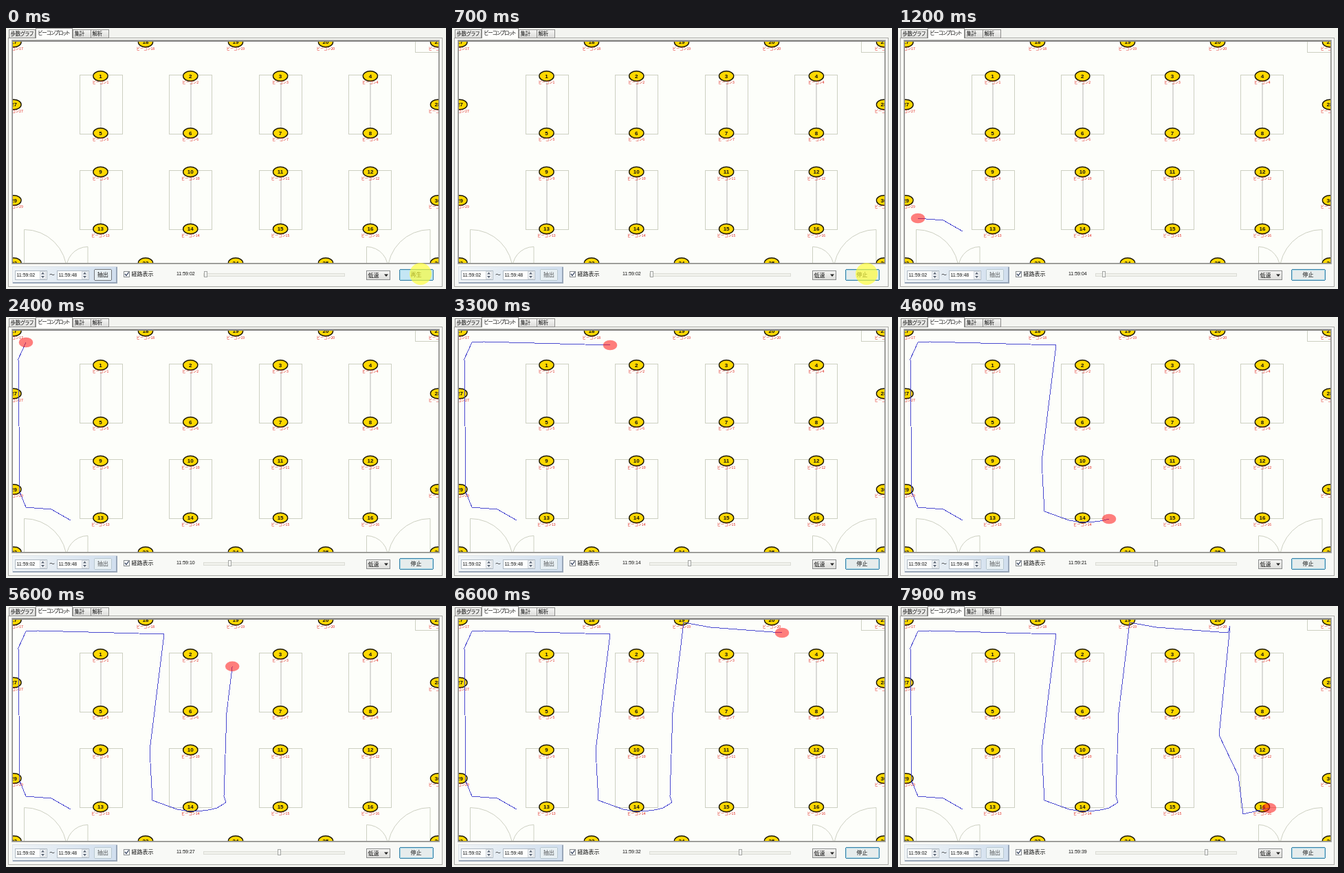
These frames come from a looping animation (640x380 px, 8 s). An HTML page:

```html
<!DOCTYPE html>
<html lang="ja">
<head>
<meta charset="utf-8">
<style>
html, body { margin: 0; width: 100%; height: 100%; overflow: hidden; background: #f3f4f0; }
svg { display: block; width: 640px; height: 380px; }
text { font-family: "Noto Sans CJK JP", "Noto Sans CJK", sans-serif; font-size: 8px; fill: #111; }
.num { font: 7px "Liberation Sans", Arial, sans-serif; }
.tab { font-size: 7.5px; font-feature-settings: "palt"; letter-spacing: -.25px; }
.tight { letter-spacing: -1px; }
.id { font: bold 8px "Liberation Sans", Arial, sans-serif; text-anchor: middle; }
.tag { font-size: 5.2px; font-weight: 500; fill: #e02018; text-anchor: middle; }
.mid { text-anchor: middle; }
rect, .crisp { shape-rendering: crispEdges; }
.plan { fill: none; stroke: #cdd0c2; }
.trail { fill: none; stroke: #4a4ad0; }
</style>
</head>
<body>
<svg viewBox="0 0 640 380">
  <linearGradient id="blue"><stop stop-color="#f0f4f6"/><stop offset="1" stop-color="#d0deee"/></linearGradient>
  <linearGradient id="grey" x2="0" y2="1"><stop stop-color="#f6f6f4"/><stop offset="1" stop-color="#dcdcda"/></linearGradient>
  <clipPath id="clip"><rect x="10" y="20" width="619" height="322"/></clipPath>
  <g id="frame"></g>
  <g id="map" clip-path="url(#clip)"></g>
  <g id="bar"></g>
</svg>
<script>
const LOOP = 8000, CLICK = 500, START = 816;
const NS = "http://www.w3.org/2000/svg";
let layer;

const use = id => layer = document.getElementById(id);
const set = (el, attrs) => { for (const k in attrs) el.setAttribute(k, attrs[k]); };
function add(tag, attrs, content = "") {
  const el = document.createElementNS(NS, tag);
  set(el, attrs);
  el.textContent = content;
  return layer.appendChild(el);
}
// Box with its one-pixel border on whole pixels
const box = (x, y, width, height, fill, stroke, rx = 0) =>
  add("rect", { x: x + .5, y: y + .5, width, height, rx, fill, stroke });
const text = (x, y, s, cls = "") => add("text", { x, y, class: cls }, s);
const line = (d, stroke, width = 1) =>
  add("path", { d, fill: "none", stroke, "stroke-width": width });

// Tabs and page
use("frame");
box(3, 14, 631, 362, "#f8f9f6", "#a8a8a4");
[[4, 38, "歩数グラフ"], [97, 26, "集計"], [123, 26, "解析"]].forEach(([x, w, s]) => {
  box(x, 2, w, 12, "url(#grey)", "#8e8e8c");
  text(x + 2.5, 11, s, "tab");
});
box(43, 0, 53, 14, "#fefefc", "#8e8e8c");
line("M44 14.5H96", "#fefefc");
text(46.5, 10, "ビーコンプロット", "tab tight");
box(8, 17, 622, 326, "#8a8a88", "#b4b4b0");
add("rect", { x: 10, y: 20, width: 619, height: 322, fill: "#fdfefa" });

// Floor plan
use("map");
const column = i => 137.5 + 130.8 * i;
add("rect", { x: 595.5, y: 15.5, width: 40, height: 20, class: "plan" });
for (let i = 0; i < 8; i++) {
  const c = i % 4, y = i < 4 ? 68 : 207;
  add("rect", { x: Math.floor(107.6 + 130.2 * c) + .5, y: y + .5, width: 62, height: 86, class: "plan" });
  line(`M${Math.floor(column(c)) + 1} ${y + 2}v83`, "#b6b6b4");
}
const door = "M26.5 343V293.5A62 62 0 0 1 88.5 355A31 31 0 0 1 119 318.5V343";
for (const transform of ["", "translate(643.5 0) scale(-1 1)"])
  add("path", { d: door, class: "plan", transform });

function beacon(id, x, y) {
  add("ellipse", { cx: x, cy: y, rx: 10.6, ry: 7.3, fill: "#ffd800", stroke: "#1c1800", "stroke-width": 1.4 });
  text(x, y + 2.8, id, "id");
  text(x, y + 11, "ビーコン" + id, "tag");
}
for (let i = 0; i < 16; i++) {
  const row = i >> 2;
  beacon(i + 1, column(i % 4), 70 + 83 * (row & 1) + 139.5 * (row >> 1));
}
[11.5, 203, 334, 465, 628].forEach((x, i) => {
  beacon(17 + i, x, 20.5);
  beacon(22 + i, x, 342);
});
for (let i = 0; i < 4; i++) beacon(27 + i, i % 2 ? 628 : 11.5, i < 2 ? 111.5 : 251);

// Legs of the walk: end time and route, each at a steady pace
let from = 800;
const legs = [
  [1200, "M94 296L66 280L29 277"],
  [2400, "M29 277L20 255L18 61L29 37"],
  [3300, "M29 37L46 36L230 41"],
  [4100, "M230 41L209 210"],
  [4600, "M209 210L213 283L249 296Q280 302 307 294"],
  [5900, "M307 294L320 286L317 277L321 155L337 24"],
  [6600, "M337 24L376 31L480 39"],
  [7900, "M480 39L483 29L467 188L495 247L502 303L540 294"]
].map(([to, d]) => {
  const el = add("path", { d, class: "trail crisp" });
  const leg = { el, from, to, length: el.getTotalLength() };
  from = to;
  return leg;
});
const walker = add("ellipse", { rx: 10.3, ry: 7.3, fill: "#ff1414", "fill-opacity": .55 });

// Control bar
use("bar");
box(9, 347, 152, 24, "url(#blue)", "#dce2e8");
line("M161 348V371H10", "#98a6b8", 2);
[[13, "11:59:02"], [74, "11:59:48"]].forEach(([x, s]) => {
  box(x, 353, 46, 13, "#fdfefe", "#b0bac4");
  text(x + 2.5, 362, s, "num");
  box(x + 36, 354, 8, 11, "#f0f3f6", "#d0d6dc");
  add("path", { d: `M${x + 38} 358.5l2.5-3l2.5 3zm0 2.5l2.5 3l2.5-3z`, fill: "#5a6474" });
});
text(63, 362, "～");
const extract = box(128, 351, 25, 16, "#e8f0f4", "", 2);
const extractText = text(141, 362.3, "抽出", "mid");
box(171, 354, 8, 8, "#fbfcfc", "#85898c");
line("M173 358l2 2.5l3.5-5", "#33405c", 1.3);
text(182.5, 361.3, "経路表示");
const clock = text(248, 360, "", "num");
box(287, 357, 205, 4, "#f0f1ec", "#dcddd6");
const thumb = box(0, 354, 4, 8, "#f4f5f2", "#a4a6a4", 1);
box(524, 353, 34, 13, "url(#grey)", "#8a8c8c", 1);
text(526.5, 362.5, "低速");
add("path", { d: "M550 358.5h6l-3 3.5z", fill: "#222" });
const play = box(572, 351, 49, 16, "", "#3f83a8", 2);
box(573, 352, 47, 14, "none", "#a4d8e8", 1);
const playText = text(596.5, 362.3, "", "mid");
const halo = add("circle", { cx: 603, cy: 358, r: 16, fill: "#ffff30", "fill-opacity": .65 });

const show = (el, on) => set(el, { visibility: on ? "visible" : "hidden" });

function draw(t) {
  const running = t >= CLICK;
  show(walker, t >= START);
  for (const { el, from, to, length } of legs) {
    const done = length * Math.min(1, (t - from) / (to - from));
    show(el, done > 0);
    if (done <= 0) continue;
    const { x, y } = el.getPointAtLength(done);
    set(el, { "stroke-dasharray": `${done} 999` });
    set(walker, { cx: x, cy: y });
  }
  const elapsed = Math.max(0, t - START) * .00523;
  clock.textContent = "11:59:" + String(Math.floor(2 + elapsed)).padStart(2, "0");
  set(thumb, { x: Math.round(288 + elapsed * 4.27) + .5 });
  set(play, { fill: running ? "#e6ecec" : "#c4e6f4" });
  playText.textContent = running ? "停止" : "再生";
  set(extract, { stroke: running ? "#b8c8d0" : "#74787c" });
  set(extractText, { "fill-opacity": running ? .7 : 1 });
  show(halo, t < 900);
}

const begin = performance.now();
function tick() {
  const t = (performance.now() - begin) % LOOP;
  draw(Math.floor(t / 100) * 100);
  requestAnimationFrame(tick);
}
tick();
</script>
</body>
</html>
```
